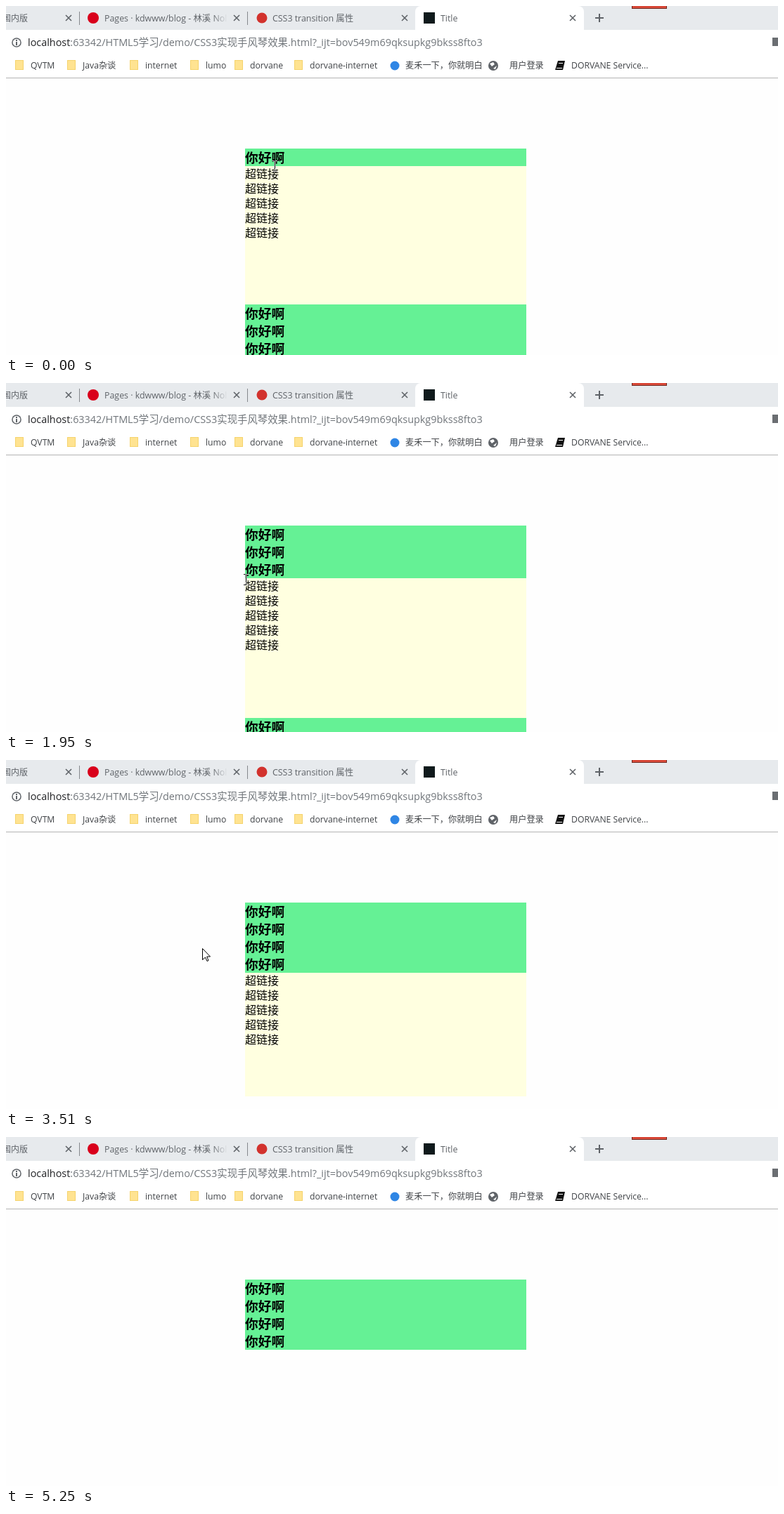
These frames come from a looping animation (1098x497 px, 6030 ms). An HTML page with a canvas:

```html
<!DOCTYPE html>
<html lang="zh-CN">
<head>
<meta charset="utf-8">
<title>Title</title>
<style>
html, body { margin: 0; width: 100%; height: 100%; overflow: hidden; background: #fefefe; }
canvas { display: block; }
</style>
</head>
<body>
<canvas id="stage" width="1098" height="497"></canvas>
<script>
const ctx = document.getElementById('stage').getContext('2d');
const LOOP = 6030;
const SANS = '"Open Sans", "Noto Sans CJK SC", sans-serif';
const CJK = '"Noto Sans CJK SC", "Noto Sans CJK", sans-serif';
const GREY = '#5f6368';

const LEFT = 340, TOP = 203, WIDTH = 400;
const HEAD = 25, LINE = 21, OPEN = 200, EASE_TIME = 960;

// One hover per panel, in order of time
const HOVERS = [
  { panel: 0, enter: -819, leave: 482 },
  { panel: 2, enter: 996, leave: 1941 },
  { panel: 3, enter: 2405, leave: 3284 },
  { panel: 1, enter: 3640, leave: 4375 }
];

// Turning points of the pointer: time, x, y
const PATH = [
  [0, 382, 228], [420, 351, 244], [690, 328, 268], [1200, 381, 266], [1800, 381, 266],
  [2220, 270, 306], [2490, 367, 324], [2610, 380, 324], [3200, 380, 324],
  [3390, 279, 268], [3780, 396, 247], [4340, 396, 247], [4470, 197, 321], [4600, 185, 326]
];
const POINTER_END = 4700;

// Linear interpolation along key points [position, ...values]
function track(keys, pos) {
  const i = keys.findIndex(k => k[0] > pos);
  if (i < 0) return keys[keys.length - 1].slice(1);
  const a = keys[i - 1], b = keys[i];
  const f = (pos - a[0]) / (b[0] - a[0]);
  return a.slice(1).map((v, j) => v + (b[j + 1] - v) * f);
}

// The screen refreshes in beats on a 30 ms grid, a little slower early on
const PACE = [[0, 0], [9, 1200], [14, 1950], [39, 5250]];
const BEATS = Array.from({ length: 40 }, (_, k) => 30 * Math.round(track(PACE, k)[0] / 30));

// CSS "ease": cubic-bezier(.25, .1, .25, 1)
function ease(x) {
  if (x <= 0) return 0;
  if (x >= 1) return 1;
  let lo = 0, hi = 1, s = 0.5;
  for (let i = 0; i < 24; i++) {
    s = (lo + hi) / 2;
    if (0.75 * s * (1 - s) + s ** 3 < x) lo = s; else hi = s;
  }
  return 0.3 * s * (1 - s) ** 2 + 3 * s * s * (1 - s) + s ** 3;
}

// A panel left before it is fully open closes proportionally faster
function heights(t) {
  const h = [0, 0, 0, 0];
  for (const { panel, enter, leave } of HOVERS) {
    const reached = ease((Math.min(t, leave) - enter) / EASE_TIME);
    const closed = t > leave ? ease((t - leave) / (EASE_TIME * reached)) : 0;
    h[panel] = Math.floor(OPEN * reached * (1 - closed));
  }
  return h;
}

function box(x, y, w, h, color) {
  ctx.fillStyle = color;
  ctx.fillRect(x, y, w, h);
}

function disc(x, y, r, color) {
  ctx.fillStyle = color;
  ctx.beginPath();
  ctx.arc(x, y, r, 0, Math.PI * 2);
  ctx.fill();
}

function poly(color, ...points) {
  ctx.fillStyle = color;
  ctx.beginPath();
  for (const [x, y] of points) ctx.lineTo(x, y);
  ctx.closePath();
  ctx.fill();
}

function line(color, width, x1, y1, x2, y2) {
  ctx.strokeStyle = color;
  ctx.lineWidth = width;
  ctx.beginPath();
  ctx.moveTo(x1, y1);
  ctx.lineTo(x2, y2);
  ctx.stroke();
}

// Returns the x where the text ends
function label(str, x, y, size, color, family = SANS, weight = 400) {
  ctx.font = `${weight} ${size}px ${family}`;
  ctx.fillStyle = color;
  ctx.fillText(str, x, y);
  return x + ctx.measureText(str).width;
}

function drawTabs() {
  box(0, 0, 1098, 34, '#e7eaed');
  ctx.fillStyle = '#fff';
  ctx.beginPath();
  ctx.roundRect(582, 0, 240, 42, 8);
  ctx.fill();

  for (let x = 89; x < 822; x += 239) {
    line(GREY, 1.6, x - 4, 13, x + 4, 21);
    line(GREY, 1.6, x + 4, 13, x - 4, 21);
  }
  line(GREY, 2, 838, 17, 850, 17);
  line(GREY, 2, 844, 11, 844, 23);
  box(104, 8, 1, 19, '#85888c');
  box(343, 8, 1, 19, '#85888c');

  label('国内版', -5, 22, 12, GREY);
  disc(124, 17, 8, '#d9001b');
  disc(364, 17, 7.5, '#d2322d');
  box(594, 9, 16, 16, '#101a1c');
  label('CSS3 transition 属性', 379, 22, 12.4, GREY);
  label('Title', 618, 22, 12.4, GREY);

  const fade = ctx.createLinearGradient(294, 0, 315, 0);
  fade.addColorStop(0, GREY);
  fade.addColorStop(1, 'rgba(95,99,104,0)');
  label('Pages · kdwww/blog - 林溪 Nolva', 140, 22, 12.4, fade);

  box(890, 0, 50, 4, '#6f2a22');
  box(891, 0, 48, 3, '#d94a3a');
}

function drawAddress() {
  box(0, 34, 1098, 68, '#fff');
  disc(15, 52, 6.8, GREY);
  disc(15, 52, 5.3, '#fff');
  box(14, 48, 2, 2, GREY);
  box(14, 51, 2, 5, GREY);
  const end = label('localhost', 31, 57, 14.4, '#202124');
  label(':63342/HTML5学习/demo/CSS3实现手风琴效果.html?_ijt=bov549m69qksupkg9bkss8fto3',
    end, 57, 14.4, '#70757a');
  box(1090, 45, 8, 12, '#6b6e72');
}

function folder(x) {
  box(x, 77, 12, 14, '#f5d36c');
  box(x + 1, 78, 10, 12, '#ffe391');
}

function paw(x) {
  disc(x + 7, 85, 6.5, '#2f86e5');
}

function globe(x) {
  disc(x - 1, 85, 7, GREY);
  poly('#fff', [x - 6, 82], [x - 1, 80], [x + 1, 83], [x - 3, 86]);
  poly('#fff', [x - 1, 89], [x + 4, 85], [x + 2, 90]);
}

function book(x) {
  poly('#111', [x + 3, 78], [x + 13, 78], [x + 10, 91], [x - 1, 91]);
  line('#fff', 1, x + 4, 81.5, x + 10, 81.5);
  line('#fff', 1, x + 1, 88.5, x + 9, 88.5);
}

const BOOKMARKS = [
  [35, 'QVTM', folder], [109, 'Java杂谈', folder], [198, 'internet', folder],
  [284, 'lumo', folder], [347, 'dorvane', folder], [432, 'dorvane-internet', folder],
  [568, '麦禾一下，你就明白', paw], [716, '用户登录', globe], [804, 'DORVANE Service...', book]
];

function drawBookmarks() {
  for (const [x, str, icon] of BOOKMARKS) {
    icon(x - 22);
    label(str, x, 89, 12.2, '#3f4246');
  }
  box(0, 102, 1098, 1, '#b4b4b4');
}

// Returns the bottom edge of the list
function drawAccordion(t) {
  let y = TOP;
  for (const h of heights(t)) {
    box(LEFT, y, WIDTH, HEAD, '#65f195');
    label('你好啊', LEFT, y + 20, 18.72, '#000', CJK, 700);
    y += HEAD;
    ctx.save();
    ctx.beginPath();
    ctx.rect(LEFT, y, WIDTH, h);
    ctx.clip();
    box(LEFT, y, WIDTH, h, '#ffffe0');
    for (let i = 0; i < 5; i++) label('超链接', LEFT, y + 17 + i * LINE, 16, '#000', CJK);
    ctx.restore();
    y += h;
  }
  return y;
}

function drawBeam(x, y) {
  ctx.save();
  ctx.globalCompositeOperation = 'difference';
  box(x, y - 7, 1, 14, '#fff');
  for (const end of [y - 8, y + 7]) {
    box(x - 3, end, 3, 1, '#fff');
    box(x + 1, end, 3, 1, '#fff');
  }
  ctx.restore();
}

function drawArrow(x, y) {
  ctx.save();
  ctx.translate(x + 0.5, y + 0.5);
  poly('#fff', [0, 0], [0, 16], [4, 12.5], [6.5, 18], [8.5, 17], [6.2, 11.5], [11, 11.5]);
  ctx.strokeStyle = '#000';
  ctx.lineWidth = 1;
  ctx.stroke();
  ctx.restore();
}

function drawPointer(t, bottom) {
  if (t > POINTER_END) return;
  const [x, y] = track(PATH, t).map(Math.round);
  const inside = x >= LEFT && x < LEFT + WIDTH && y >= TOP && y < bottom;
  (inside ? drawBeam : drawArrow)(x, y);
}

function draw(now) {
  const t = BEATS.findLast(b => b <= now % LOOP);
  box(0, 0, 1098, 497, '#fefefe');
  drawTabs();
  drawAddress();
  drawBookmarks();
  drawPointer(t, drawAccordion(t));
}

const began = performance.now();
function tick() {
  draw(performance.now() - began);
  requestAnimationFrame(tick);
}
tick();
</script>
</body>
</html>
```
